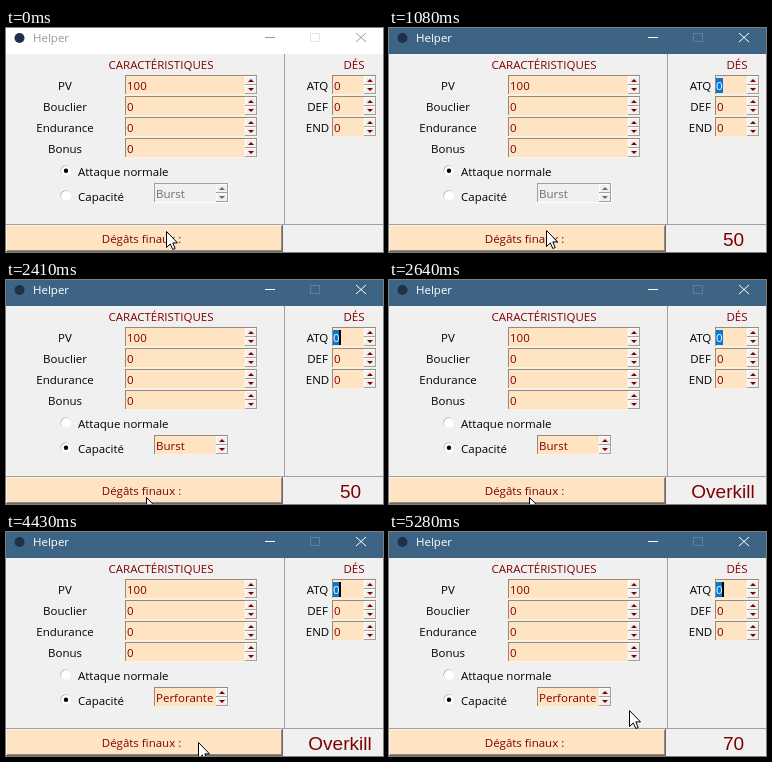
An HTML page with a canvas that plays this animation: 377x224 px, repeating every 5.36 s.

```html
<!DOCTYPE html>
<html lang="fr">
<head>
<meta charset="utf-8">
<title>Helper</title>
<style>
html, body { margin: 0; width: 377px; height: 224px; overflow: hidden; }
canvas { display: block; }
</style>
</head>
<body>
<canvas id="stage" width="377" height="224"></canvas>
<script>
const ctx = document.getElementById('stage').getContext('2d');
const LOOP = 5360;
const FACE = '#f0f0f0', BISQUE = '#ffe4c4', RED = '#800000', GREY = '#6d6d6d';
const SHADE = '#a0a0a0', DARK = '#696969', BROWN = '#998976', CREAM = '#fff1e1';
const UI = '11.5px "Open Sans", "Noto Sans", sans-serif';
const BIG = '19px "Liberation Sans", Arial, sans-serif';

// Pointer moves: start, step duration, step count, end x, end y
const START = [160, 203];
const MOVES = [
  [1010, 75.7, 8, 90, 173],
  [1710, 76, 6, 140, 216],
  [2410, 1, 1, 140, 217],
  [2870, 76.6, 7, 204, 178],
  [3410, 75, 3, 215, 168],
  [3800, 76, 4, 192, 210],
  [4980, 1, 1, 192, 209],
  [5280, 1, 1, 240, 178]
];
const within = (t, from, to) => t >= from && t < to;
const pressing = t => within(t, 230, 310) || within(t, 2490, 2565) || within(t, 4510, 4580);
const clicking = t => pressing(t) || within(t, 1640, 1710) || within(t, 3730, 3800);
const caretOn = t => t >= 240 && (t - 240) % 900 < 600;

function rect(x, y, w, h, fill) {
  ctx.fillStyle = fill;
  ctx.fillRect(x, y, w, h);
}

function text(s, x, y, fill = '#000', align = 'left', font = UI) {
  ctx.font = font;
  ctx.textAlign = align;
  ctx.fillStyle = fill;
  ctx.fillText(s, x, y);
}

function circle(x, y, r, fill) {
  ctx.fillStyle = fill;
  ctx.beginPath();
  ctx.arc(x, y, r, 0, Math.PI * 2);
  ctx.fill();
}

function bevel(x, y, w, h, topLeft, bottomRight, fill) {
  rect(x, y, w, h, bottomRight);
  rect(x, y, w - 1, h - 1, topLeft);
  rect(x + 1, y + 1, w - 2, h - 2, fill);
}

function arrow(x, y, dir, fill) {
  ctx.fillStyle = fill;
  ctx.beginPath();
  ctx.moveTo(x - 3, y - dir * 1.5);
  ctx.lineTo(x + 3, y - dir * 1.5);
  ctx.lineTo(x, y + dir * 1.5);
  ctx.fill();
}

function spinbox(x, y, w, h, value, enabled = true) {
  const ink = enabled ? RED : GREY, half = (h - 2) / 2;
  bevel(x, y, w, h, enabled ? BROWN : SHADE, enabled ? CREAM : '#fff', enabled ? BISQUE : FACE);
  for (const i of [0, 1]) {
    const top = y + 1 + i * half;
    bevel(x + w - 13, top, 12, half, '#fff', SHADE, FACE);
    arrow(x + w - 7, top + half / 2, i ? 1 : -1, ink);
  }
  text(value, x + 2, y + h / 2 + 5, ink);
}

function radio(y, label, on) {
  circle(59.5, y - .5, 5, SHADE);
  circle(60, y, 5, '#fff');
  if (on) circle(60, y - .3, 2.2, '#000');
  text(label, 72, y + 5);
}

function line(color, ...points) {
  ctx.strokeStyle = color;
  ctx.lineWidth = 1;
  ctx.beginPath();
  points.forEach(([x, y], i) => i % 2 ? ctx.lineTo(x, y) : ctx.moveTo(x, y));
  ctx.stroke();
}

function titleBar(active) {
  const ink = active ? '#fff' : '#999';
  rect(0, 0, 377, 26, active ? '#3d6485' : '#fff');
  circle(13.5, 10, 5, '#20304a');
  text('Helper', 27, 14, ink);
  line(ink, [259, 9.5], [269, 9.5], [350, 5], [360, 14], [360, 5], [350, 14]);
  ctx.strokeStyle = active ? '#5d7f9a' : '#e4e4e4';
  ctx.strokeRect(304.5, 5.5, 9, 8);
}

function pointerAt(t) {
  let [x, y] = START;
  for (const [from, step, count, toX, toY] of MOVES) {
    if (t < from) break;
    const p = Math.min(count, Math.floor((t - from) / step) + 1) / count;
    const e = p * p * (3 - 2 * p);
    x += (toX - x) * e;
    y += (toY - y) * e;
  }
  return [Math.round(x), Math.round(y)];
}

const arrowShape = new Path2D('M.5 .5V16.5L4.3 12.9L6.8 18.5L9.2 17.5L6.8 11.9H11.5Z');

function pointer(t) {
  const [x, y] = pointerAt(t);
  ctx.save();
  ctx.translate(x, y);
  if (clicking(t)) {
    ctx.globalCompositeOperation = 'multiply';
    circle(0, 0, 12, '#ffff70');
    ctx.globalCompositeOperation = 'source-over';
  }
  ctx.fillStyle = '#fff';
  ctx.fill(arrowShape);
  ctx.strokeStyle = '#000';
  ctx.lineWidth = 1;
  ctx.stroke(arrowShape);
  ctx.restore();
}

function button(pressed) {
  const shift = pressed ? 1 : 0;
  const fill = pressed ? FACE : BISQUE;
  bevel(0, 197, 277, 27, pressed ? DARK : CREAM, pressed ? '#fff' : DARK, fill);
  if (!pressed) bevel(1, 198, 275, 25, fill, BROWN, fill);
  text('Dégâts finaux :', 135.5 + shift, 215 + shift, pressed ? '#000' : RED, 'center');
}

function draw(t) {
  const active = t >= 230, ability = t >= 1710;
  rect(0, 0, 377, 224, FACE);
  titleBar(active);

  text('CARACTÉRISTIQUES', 155, 41, RED, 'center');
  ['PV', 'Bouclier', 'Endurance', 'Bonus'].forEach((label, i) => {
    text(label, 59, 62 + i * 21, '#000', 'center');
    spinbox(119, 47 + i * 21, 133, 20, i ? '0' : '100');
  });
  text('DÉS', 348, 41, RED, 'center');
  ['ATQ', 'DEF', 'END'].forEach((label, i) => {
    text(label, 311.5, 62 + i * 21, '#000', 'center');
    spinbox(326, 47 + i * 21, 45, 20, i || !active ? '0' : '');
  });
  if (active) {
    rect(327, 50, 7, 15, '#0078d7');
    text('0', 327, 62, '#fff');
    if (caretOn(t)) rect(333, 50, 2, 15, '#000');
  }

  radio(143, 'Attaque normale', !ability);
  radio(168, 'Capacité', ability);
  spinbox(148, 155, 75, 20, t < 3730 ? 'Burst' : 'Perforante', ability);

  rect(278, 26, 1, 170, SHADE);
  rect(0, 196, 377, 1, SHADE);
  button(pressing(t));

  const result = t < 310 ? '' : t < 2565 ? '50' : t < 4580 ? 'Overkill' : '70';
  text(result, result === 'Overkill' ? 334 : 344.5, 218, RED, 'center', BIG);
  pointer(t);
}

const begin = performance.now();
function frame() {
  draw((performance.now() - begin) % LOOP);
  requestAnimationFrame(frame);
}
frame();
</script>
</body>
</html>
```
